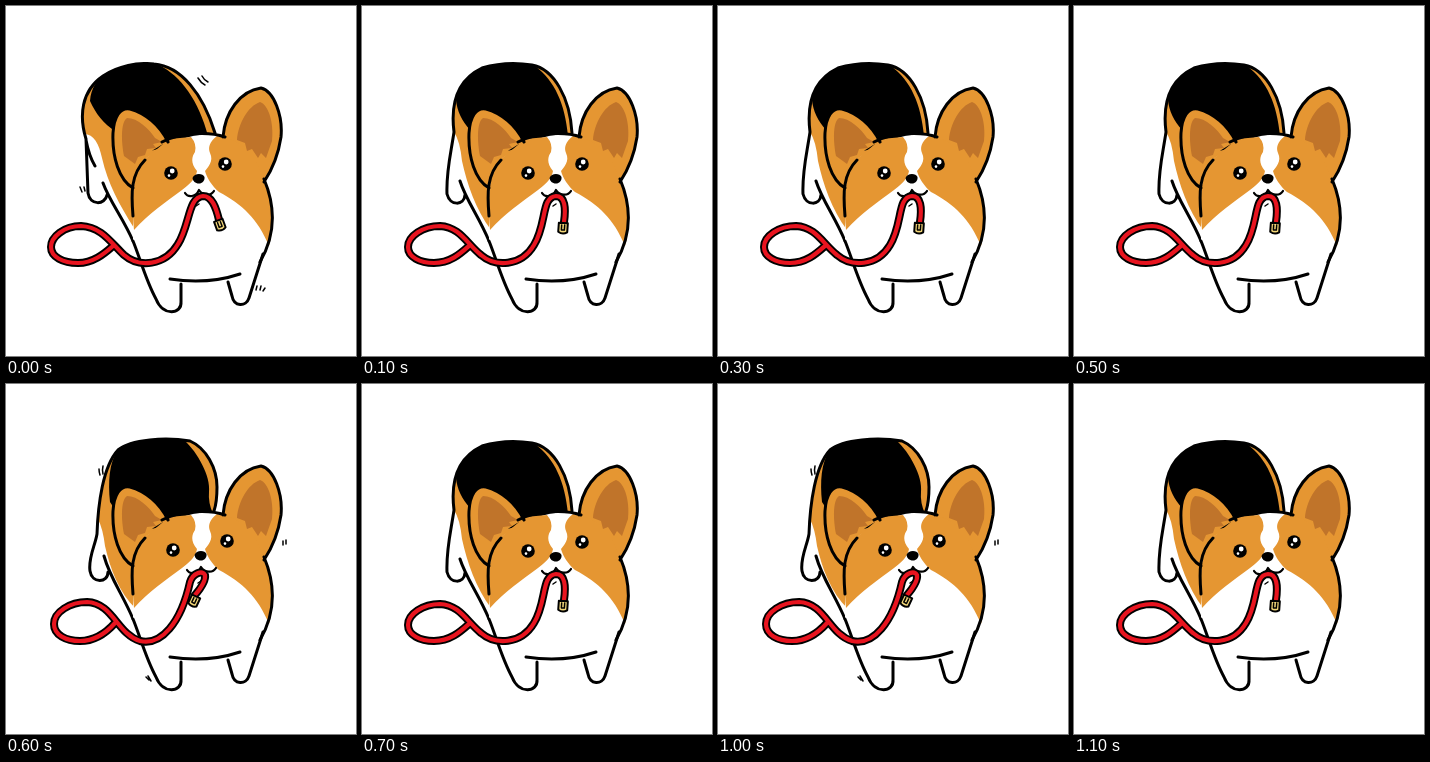
These frames come from a looping animation (350x350 px, 2100 ms). An HTML page:

```html
<!DOCTYPE html>
<html lang="en">
<head>
<meta charset="utf-8">
<title>Corgi wagging with a leash</title>
<style>
  html, body { margin: 0; width: 100%; height: 100%; overflow: hidden; background: #fff; }
  svg { display: block; width: 100%; height: 100%; }
  path, use { stroke-linecap: round; stroke-linejoin: round; }
  .tan { fill: #e59632; }
  .inner { fill: #c0742a; }
  .white { fill: #fff; }
  .line { fill: none; stroke: #000; stroke-width: 3; }
  .thin { fill: none; stroke: #000; stroke-width: 1.5; }
  .edge { fill: none; stroke: #000; stroke-width: 8; }
  .strap { fill: none; stroke: #e8141f; stroke-width: 4.2; }
  .left, .right { animation: side 2100ms step-end infinite; }
  .right { animation-delay: -1900ms; }
  .mid { animation: centre 2100ms step-end infinite; }
  @keyframes side {
    0%, 19.04%, 38.09% { opacity: 1; }
    4.76%, 23.8%, 42.85%, 100% { opacity: 0; }
  }
  @keyframes centre {
    0%, 9.52%, 19.04%, 28.57%, 38.09%, 47.61% { opacity: 0; }
    4.76%, 14.28%, 23.8%, 33.33%, 42.85%, 52.38%, 100% { opacity: 1; }
  }
</style>
</head>
<body>
<svg viewBox="0 0 350 350">
  <defs>
    <path id="leashL" d="M213 214C210 201 206 190 197 190C182 191 184 219 172 238C159 260 133 262 118 249C105 237 96 221 75 220C58 220 45 231 45 241C45 251 57 257 72 257C87 257 98 248 107 240"/>
    <path id="leashM" d="M202 216C204 202 203 190 194 190C179 191 185 218 172 239C159 261 133 261 119 249C105 238 98 221 78 220C61 220 46 230 46 241C46 251 58 257 72 257C88 257 98 248 107 240"/>
    <path id="leashR" d="M189 211C195 204 200 197 199 191C196 186 187 189 184 198C175 239 155 262 134 257C111 250 107 219 81 218C64 218 48 228 48 240C48 251 60 257 74 257C90 257 101 248 109 239"/>
    <g id="clasp">
      <path d="M-4.5 -5H4.5V4Q0 7 -4.5 4Z" fill="#f3d779" stroke="#000" stroke-width="2"/>
      <path class="thin" d="M-1.5 -3V2H1.5V-3"/>
    </g>
    <g id="eye">
      <circle r="6.8"/>
      <circle class="white" cx="1.2" cy="-2" r="2.4"/>
      <circle class="white" cx="-2" cy="2.6" r="1.3"/>
    </g>
    <g id="face">
      <use href="#eye" x="166" y="167"/>
      <use href="#eye" x="220" y="158"/>
      <path d="M187.500 172C189 167 198 167 199.500 171C200 175 197 177.500 194 177.500C190 177.500 188 175 187.500 172Z"/>
      <path class="line" style="stroke-width:2.2" d="M180 187C183 192 191 191 194 184C198 190 206 190 209 185"/>
      <path class="thin" d="M191 200L194 198"/>
    </g>
  </defs>

  <!-- Hindquarters -->
  <g class="left">
    <path class="white" d="M80 133C73 110 75 85 97 70C112 60 132 56 148 58C175 60 197 88 209 127L150 240L101 189C98 199 84 201 82 189Z"/>
    <path class="tan" d="M78 128C74 105 76 85 97 70C112 60 132 56 148 58C175 60 197 88 209 127L128 222C113 198 102 178 96 152C93 138 88 128 78 128Z"/>
    <path d="M84 95C85 82 91 74 97 70C112 60 132 56 153 59C175 70 193 95 202 130L125 150L110 126C97 117 90 108 84 95Z"/>
    <path class="line" d="M80 133C73 110 75 85 97 70C112 60 132 56 148 58C175 60 197 88 209 127M80 133Q81 160 82 187C84 200 99 199 101 189M80 134Q83 150 89 160M97 177C104 196 117 212 127 235"/>
    <path class="thin" d="M192 72Q195 77 199 79M196 70Q198 74 202 76M74 181L76 186M78 181L79 185"/>
  </g>
  <g class="mid">
    <path class="white" d="M92 126C88 94 97 73 120 62C140 56 158 57 170 59C192 63 208 92 210 128L150 240L103 190C102 200 87 201 85 189Z"/>
    <path class="tan" d="M92 126C88 94 97 73 120 62C140 56 158 57 170 59C192 63 208 92 210 128L129 224C114 204 105 178 100 155Q98 135 92 126Z"/>
    <path d="M94 94C96 79 106 68 120 62C140 56 158 57 173 60C193 75 203 98 206 130L125 150L108 124C100 115 95 105 94 94Z"/>
    <path class="line" d="M92 126C88 94 97 73 120 62C140 56 158 57 170 59C192 63 208 92 210 127M92 126C89 147 84 165 85 188C88 200 102 200 103 189M98 175C104 194 117 211 127 235"/>
  </g>
  <g class="right">
    <path class="white" d="M91 150C92 120 97 82 112 66C125 55 160 53 184 57C200 64 211 84 211 103Q211 118 208 128L150 240L102 188C103 198 86 200 84 188Z"/>
    <path class="tan" d="M92 135C94 110 99 80 112 66C125 55 160 53 184 57C200 64 211 84 211 103Q211 118 208 128L130 225C113 209 104 184 99 162Q97 145 92 135Z"/>
    <path d="M104 118C102 98 103 78 112 66C125 55 160 53 179 57C191 68 205 92 203 108Q202 118 207 130L125 150Z"/>
    <path class="line" d="M91 150C92 120 97 82 112 66C125 55 160 53 184 57C200 64 211 84 211 103Q211 118 208 127M91 150C89 162 82 174 84 187C86 200 102 199 102 188M98 172C104 194 117 211 127 235"/>
    <path class="thin" d="M93 85Q93 88 94 91M97 82Q96 86 97 90M277 157V161M280 156V160M140 293L143 296M142 292L145 297"/>
  </g>

  <!-- Chest, head and ears -->
  <path class="white" d="M139 153C128 164 125 185 127 212V235C134 252 140 275 150 293C157 311 176 308 175 296V276Q200 279 222 275L226 290C228 301 240 301 243 292L254 256C268 232 271 204 258 173L222 131Q185 120 139 153Z"/>
  <path class="tan" d="M185 131L163 133L139 153C128 164 125 185 128 224C142 208 160 196 176 184C184 178 190 172 191 165C184 157 186 150 189 146Q191 138 185 131ZM211 130C203 136 202 142 204 147C208 155 202 161 199 165C201 172 206 180 213 186C236 198 252 213 263 240C270 214 267 192 258 173C254 150 240 133 211 130Z"/>
  <path class="tan" d="M127 182C113 174 106 151 107 127C108 111 114 101 124 103C139 107 154 119 162 136Q146 142 138 154Q129 166 127 182Z"/>
  <path class="inner" d="M118 150C115 133 115 116 121 112C132 112 143 123 149 132L156 136L147 138L150 142L141 143L139 149L132 151L129 158Z"/>
  <path class="tan" d="M217 131C219 106 234 85 255 82C268 85 277 110 275 131C272 151 266 164 258 176C252 153 241 138 217 131Z"/>
  <path class="inner" d="M254 96C263 99 268 118 266 135L260 152L255 147L252 152L246 143L241 145L239 137L231 134C232 118 242 100 254 96Z"/>
  <path class="line" d="M127 182C113 174 106 151 107 127C108 111 114 101 124 103C139 107 154 119 162 136M139 154C125 168 125 187 127 210M156 136C173 127 202 125 219 131M217 131C219 106 234 85 255 82C268 85 277 110 275 131C272 151 266 164 258 176M258 173C271 204 268 232 254 256"/>
  <path class="line" d="M127 235C134 252 140 275 150 293C157 311 176 308 175 296V278M164 273Q201 279 234 268M222 276L226 290C228 301 240 301 243 292L257 248"/>

  <!-- Face and leash -->
  <g class="left">
    <use href="#face" x="-1"/>
    <use href="#leashL" class="edge"/><use href="#leashL" class="strap"/>
    <use href="#clasp" transform="translate(214 219) rotate(-20)"/>
    <path class="thin" d="M251 280L250 284M255 280L254 284M257 285L259 282"/>
  </g>
  <g class="mid">
    <use href="#face"/>
    <use href="#leashM" class="edge"/><use href="#leashM" class="strap"/>
    <use href="#clasp" transform="translate(201 222) rotate(4)"/>
  </g>
  <g class="right">
    <use href="#face" x="1" y="-1"/>
    <use href="#leashR" class="edge"/><use href="#leashR" class="strap"/>
    <use href="#clasp" transform="translate(188 217) rotate(25)"/>
  </g>
</svg>
</body>
</html>
```
